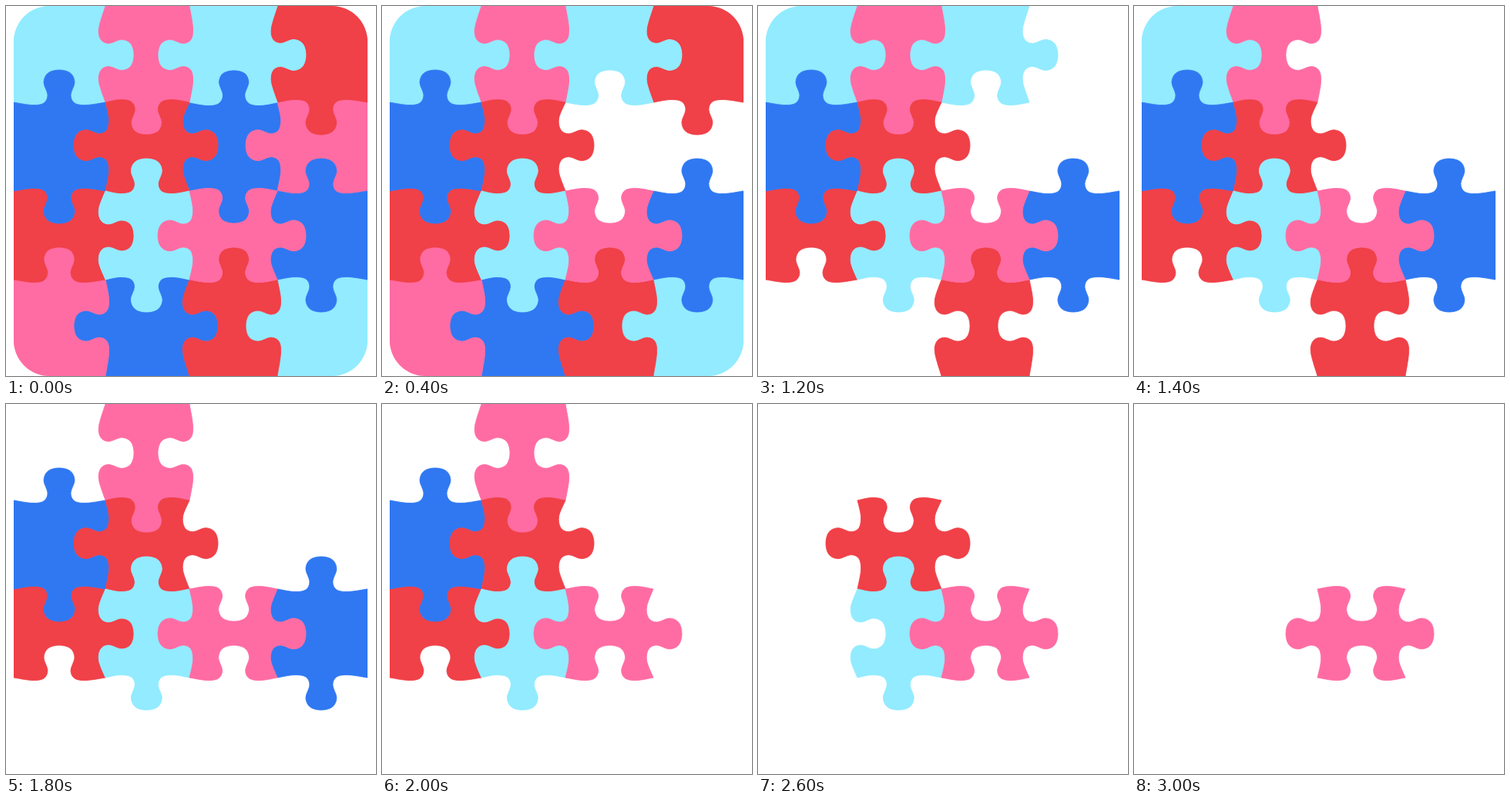
Animation of 480x480 px, one loop 3.2 s. Source, as an HTML page:

```html
<!DOCTYPE html>
<html lang="en">
<head>
<meta charset="utf-8">
<title>Jigsaw</title>
<style>
  html, body { margin: 0; width: 100%; height: 100%; overflow: hidden; background: #fff; }
  svg { display: block; width: 100%; height: 100%; }
</style>
</head>
<body>
<svg viewBox="0 0 480 480">
  <clipPath id="board"><rect x="10" y="0" width="459" height="480" rx="46"/></clipPath>
  <g id="pieces" clip-path="url(#board)" stroke-width="0.8" stroke-linejoin="round"></g>
</svg>
<script>
const STEP = 200, LOOP = 3200, SIZE = 4;
const CYAN = '#92ebff', PINK = '#ff6ca3', BLUE = '#2f78f2', RED = '#f04048';

const columns = [10, 129, 238, 352, 469];
const rows = [0, 125, 240, 355, 480];
const corner = (r, c) => [columns[c], rows[r]];

// Half a knob, from shoulder to head: [distance from its axis, distance below its tip].
const halfKnob = [[35, 45.5], [20, 43], [15, 32.5], [20, 16], [14.5, 4]];
const knob = [
  ...halfKnob.map(([side, drop]) => [-side, drop]),
  [0, 0],
  ...halfKnob.slice().reverse()
];

// Knobs alternate in direction like a chessboard.
const direction = (r, c) => (r + c) % 2 ? -1 : 1;

// Seam above piece r, c, from left to right.
function acrossSeam(r, c) {
  const ends = [corner(r, c), corner(r, c + 1)];
  if (r % SIZE === 0) return ends;
  const way = direction(r, c);
  const x = 69 + 113.3 * c, y = rows[r] + way * 42;
  return [ends[0], ...knob.map(([side, drop]) => [x + side, y - way * drop]), ends[1]];
}

// Seam left of piece r, c, from top to bottom.
function downSeam(r, c) {
  const ends = [corner(r, c), corner(r + 1, c)];
  if (c % SIZE === 0) return ends;
  const way = -direction(r, c);
  const x = columns[c] - 2 + way * 39, y = 63.5 + 117.2 * r;
  return [ends[0], ...knob.map(([side, drop]) => [x - way * drop, y + side]), ends[1]];
}

// Catmull-Rom spline through the points, as cubic curves.
function spline(points) {
  const at = i => points[Math.max(0, Math.min(points.length - 1, i))];
  const handle = (p, a, b) => p.map((value, k) => (value + (b[k] - a[k]) / 6).toFixed(2));
  return points.slice(1).map((end, i) => {
    const start = points[i];
    const out = handle(start, at(i - 1), end);
    const back = handle(end, at(i + 2), start);
    return `C${out} ${back} ${end}`;
  }).join('');
}

function outline(r, c) {
  const sides = [
    acrossSeam(r, c),
    downSeam(r, c + 1),
    acrossSeam(r + 1, c).reverse(),
    downSeam(r, c).reverse()
  ];
  return `M${corner(r, c)}${sides.map(spline).join('')}Z`;
}

const colors = [
  [CYAN, PINK, CYAN, RED],
  [BLUE, RED, BLUE, PINK],
  [RED, CYAN, PINK, BLUE],
  [PINK, BLUE, RED, CYAN]
];

// Row and column of each piece, in the order they vanish.
const order = '12 13 31 30 33 03 02 00 32 23 20 01 10 11 21 22'.split(' ');

const group = document.getElementById('pieces');
const pieces = order.map(([r, c]) => {
  const path = document.createElementNS('http://www.w3.org/2000/svg', 'path');
  path.setAttribute('d', outline(+r, +c));
  path.setAttribute('fill', colors[r][c]);
  path.setAttribute('stroke', colors[r][c]);
  return group.appendChild(path);
});

function render(time) {
  const gone = Math.floor((time % LOOP) / STEP);
  pieces.forEach((piece, i) => {
    piece.setAttribute('visibility', i < gone ? 'hidden' : 'visible');
  });
}

const begin = performance.now();
function tick() {
  render(performance.now() - begin);
  requestAnimationFrame(tick);
}
tick();
</script>
</body>
</html>
```
